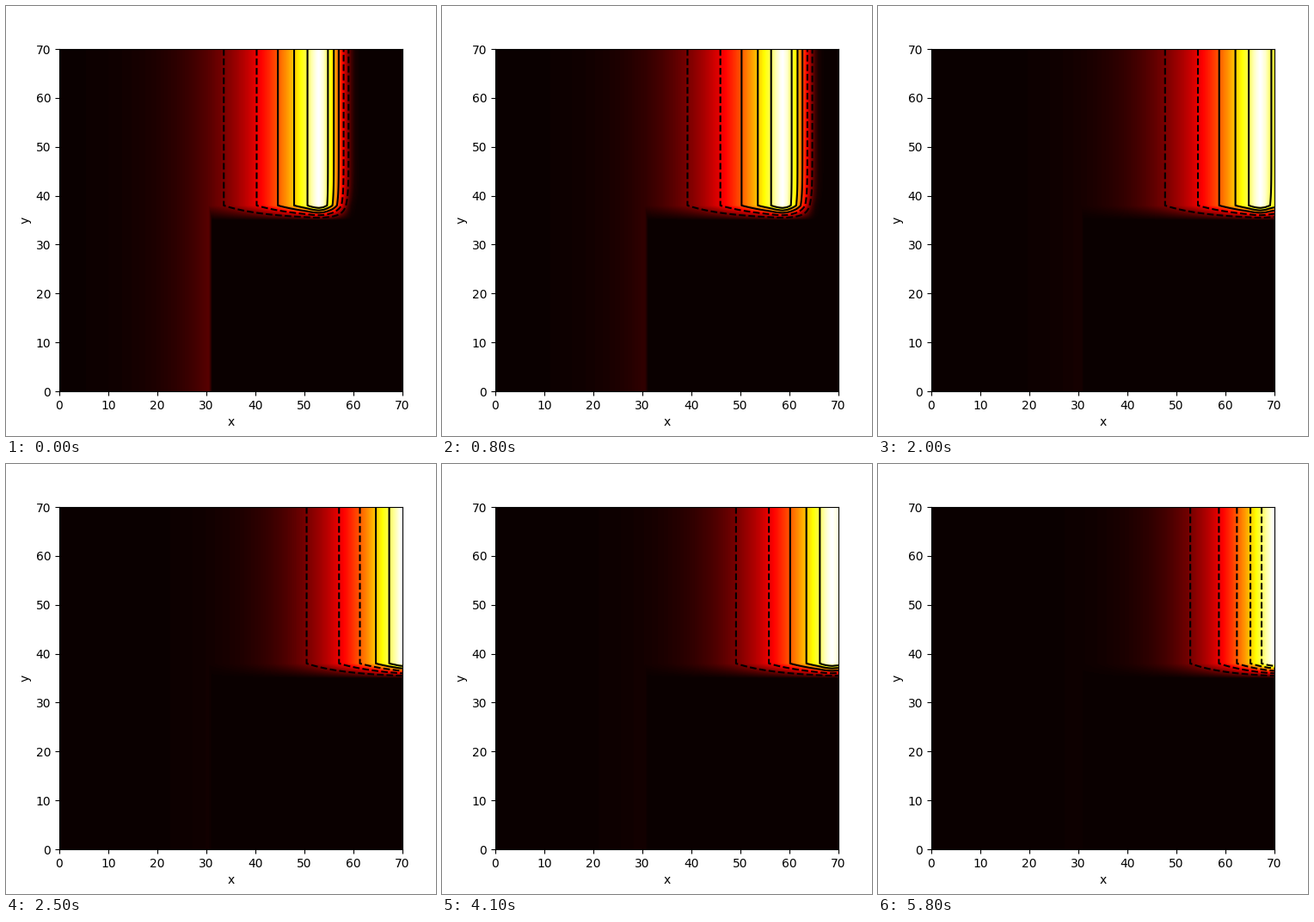
Recreate the animation shown at these times as a matplotlib script. Size 500 px wide and 500 px high, loop 5900 ms.

```python
import numpy as np
import matplotlib.pyplot as plt
from matplotlib.animation import FuncAnimation

FRAMES, INTERVAL = 59, 100
SIZE = 70
SPEED = 0.707            # wave travel per frame
START = 53.0             # crest position at the beginning
REPLAY, BACK = 40, 19    # the late part of the run is shown twice
REST, SWING = -1.0, 2.1

axis = np.linspace(0, SIZE, 351)
X, Y = np.meshgrid(axis, axis)

# The lower right block stays at rest, with a soft upper edge.
upper = np.clip((Y - 35) / 3, 0, 1)
left = np.clip((31.2 - X) / 0.7, 0, 1)
tissue = np.maximum(upper, left)

# The front lags a little beside the block; the far wall flattens the wave.
lag = 1 + 0.1 * np.exp(-np.clip(Y - 38, 0, None) / 2)
x_eff = X - 0.8 * np.exp(X - SIZE)

FRONT_X = [0, 0.9, 1.8, 3, 4, 5, 6, 6.6, 7.3, 8.5]
FRONT_U = [1, 0.95, 0.833, 0.667, 0.5, 0.333, 0.167, 0.08, 0.02, 0]


def pulse(xi):
    """Steep front for xi > 0, long tail behind the crest."""
    d = np.clip(-xi, 0, None)
    tail = np.exp(-0.075 * d - 0.00088 * d ** 2)
    crest = 1 - 0.17 * (np.minimum(d, 2.4) / 2.4) ** 1.5
    back = np.where(d < 2.4, crest, tail)
    return np.where(xi > 0, np.interp(xi, FRONT_X, FRONT_U), back)


def potential(i):
    step = i if i < REPLAY else i - BACK
    xi = x_eff - START - SPEED * step
    xi = np.where(xi > 0, xi * lag, xi)
    return REST + SWING * pulse(xi) * tissue


fig = plt.figure(figsize=(5, 5), dpi=100)
ax = fig.add_axes([62 / 500, 52 / 500, 399 / 500, 398 / 500])
half = (axis[1] - axis[0]) / 2
image = ax.imshow(potential(0), cmap="hot", origin="lower", aspect="auto",
                  interpolation="bilinear",
                  extent=(-half, SIZE + half, -half, SIZE + half))
ax.set(xlim=(0, SIZE), ylim=(0, SIZE), xlabel="x", ylabel="y")
lines = None


def draw(i):
    global lines
    v = potential(i)
    image.set_data(v)
    image.set_clim(v.min(), v.max())
    if lines is not None:
        lines.remove()
    levels = np.linspace(v.min(), v.max(), 7)[1:-1]
    lines = ax.contour(X, Y, v, levels=levels, colors="k", linewidths=1.5)
    ax.set(xlim=(0, SIZE), ylim=(0, SIZE))
    return [image, lines]


anim = FuncAnimation(fig, draw, frames=FRAMES, interval=INTERVAL,
                     init_func=lambda: draw(0), repeat=True)
plt.show()
```
